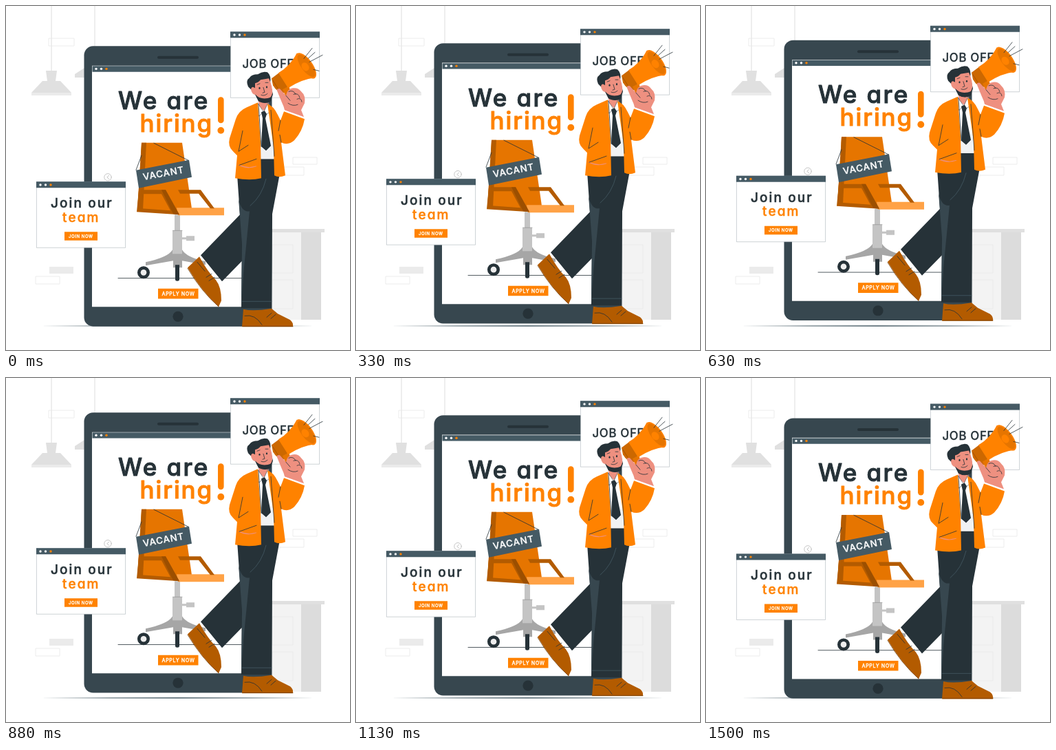
An HTML page for the animation above (1540 ms loop, 500x500 px).

```html
<!DOCTYPE html>
<html lang="en">
<head>
<meta charset="utf-8">
<style>
  html, body { margin: 0; width: 100%; height: 100%; overflow: hidden; background: #fff; }
  svg { display: block; width: 100vw; height: 100vh; }
  text { font-family: Inter, "Open Sans", sans-serif; font-weight: 500; font-feature-settings: "cv11"; stroke-width: .3; stroke-linejoin: round; }
  .big { font-size: 35px; letter-spacing: 2.4px; stroke-width: 1; }
  .mid { font-size: 19px; letter-spacing: 2.1px; stroke-width: .5; }
  .ink { fill: #263238; } .slate { fill: #37474f; } .steel { fill: #455a64; }
  .orange { fill: #ff8200; } .amber { fill: #e67500; } .brown { fill: #b35b00; }
  .skin { fill: #ee9080; } .white { fill: #fff; }
  text.ink { stroke: #263238; } text.orange { stroke: #ff8200; } text.white { stroke: #fff; }
  .line { fill: none; stroke: #263238; stroke-width: .8; stroke-linecap: round; stroke-linejoin: round; }
  .faint { fill: none; stroke: #e8e8e8; stroke-width: .8; }
</style>
</head>
<body>
<svg viewBox="0 0 500 500">
  <defs>
    <g id="dots">
      <circle class="white" r="1.7"/>
      <circle class="white" cx="7.5" r="1.7"/>
      <circle class="orange" cx="15" r="1.7"/>
    </g>
    <g id="window">
      <path d="M.4 .4H129.6V96H.4Z" fill="#fff" stroke="#9aa5aa" stroke-width=".5"/>
      <path class="steel" d="M0 0H130V9H0Z"/>
      <use href="#dots" x="6" y="4.7"/>
    </g>
  </defs>

  <!-- room -->
  <g fill="#e0e0e0">
    <path d="M66 0V95M129 0V90" stroke="#dcdcdc"/>
    <path d="M58 94H74L72 109H60Z"/>
    <path d="M37 126 53 109H79L95 126V130H37Z"/>
    <path d="M37 126H95V130H37Z" fill="#ebebeb"/>
    <path d="M100 99 114 90V104H100Z"/>
    <path d="M63 379H98V389H63Z" fill="#ebebeb"/>
    <path d="M385 329H429V456H385Z" fill="#f3f3f3"/>
    <path d="M429 329H458V456H429Z" fill="#dcdcdc"/>
    <path d="M385 324H463V329H385Z"/>
    <path class="faint" d="M62 47H99V58H62ZM43 393H78V404H43ZM417 220H452V230H417ZM385 234H433V246H385ZM387 347H417V388H387ZM387 398H417V440H387Z"/>
  </g>
  <path class="steel" d="M50 465Q249 463.6 449 465Q249 466.4 50 465Z"/>

  <g id="float">
    <!-- tablet -->
    <rect class="slate" x="113.500" y="58" width="273" height="407.300" rx="13"/>
    <path class="white" d="M125 86.400H376V437H125Z"/>
    <path class="steel" d="M125.500 87H376V95.300H125.500Z"/>
    <use href="#dots" x="131" y="91"/>
    <rect class="ink" x="220" y="72.500" width="60" height="4" rx="2"/>
    <circle class="ink" cx="250" cy="451" r="7.600"/>
    <circle class="line" cx="148" cy="248.500" r="5.200" style="stroke:#b8b8b8"/>
    <path class="line" d="M149.500 246 147 248.500 149.500 251" style="stroke:#aaa"/>
    <text class="big ink" x="163" y="149.700">We are</text>
    <text class="big orange" x="194.500" y="182.500" style="letter-spacing:1.900px">hiring</text>
    <rect class="orange" x="308" y="132" width="8.600" height="38" rx="4.200"/>
    <circle class="orange" cx="312.300" cy="180.500" r="4.900"/>
    <path class="orange" d="M221 410.500H279.500V425.200H221Z"/>
    <text class="white" x="226.500" y="420.600" font-size="7.200" letter-spacing=".55">APPLY NOW</text>

    <!-- windows -->
    <use href="#window" x="326" y="37"/>
    <text class="ink" x="343.500" y="89.500" font-size="16.800" letter-spacing=".7">JOB OFFER</text>
    <use href="#window" x="44" y="255"/>
    <text class="mid ink" x="65" y="293">Join our</text>
    <text class="mid orange" x="82" y="313.500">team</text>
    <path class="orange" d="M85 328H133V340.500H85Z"/>
    <text class="white" x="91" y="336.500" font-size="6" letter-spacing=".6">JOIN NOW</text>

    <!-- chair -->
    <path class="line" d="M163 395.300H344"/>
    <path fill="#a6a6a6" d="M242 354Q236 365 203 372V377L243 370V380H256V370L290 376V371Q262 365 256 354Z"/>
    <path fill="#c4c4c4" d="M245 303H253V326H256V360H242V326H245ZM256 336H262V334H274V341H262V339H256Z"/>
    <path class="line" d="M242.500 326H256" style="stroke:#999"/>
    <path class="ink" d="M246 376H252V397Q252 399.500 249 399.500T246 397Z"/>
    <circle class="ink" cx="200" cy="387" r="9"/>
    <circle cx="200" cy="387" r="4.300" fill="#eee"/>
    <path class="amber" d="M197 198.500H256L270 294 245 300 191 297Z"/>
    <path class="brown" d="M197 198.500H204L199 296 191 297Z"/>
    <path d="M248 293H317V304H250Z" fill="#ffa246"/>
    <path class="brown" d="M250 267H283L303 294H297L280 272.500H253Z"/>
    <path class="brown" fill-rule="evenodd" d="M193 267H232L252 303 190 299ZM199 273 197 294 239 297 226 273Z"/>
    <path fill="#9c4f00" d="M226 267H232L252 303 243 302Z"/>
    <path class="line" d="M189 238 197 217M215 199 265 224"/>
    <path class="steel" d="M189 238.500 266 223.500 270 248.500 193 264.500Z"/>
    <text class="white" transform="translate(200 253) rotate(-10.500)" font-size="13.400" letter-spacing=".9">VACANT</text>

    <!-- legs -->
    <path class="ink" d="M338 245H385L382 310 363 350 314 400 283 362 342 301Z"/>
    <path class="ink" d="M336 245 366 218H392L398 243 387 302 386 439H342L343 345Z"/>
    <path class="slate" d="M338 280Q342 300 354 298L345 390 342 438 343 345Z"/>
    <path class="line" d="M343 429H386M378 251Q372 276 355 290" style="stroke:#455a64"/>
    <path class="brown" d="M264 380 281 364Q293 386 305 398 313 408 313 428L309 437Q284 414 264 380Z"/>
    <path class="line" d="M264 381Q284 415 309 436.500" style="stroke:#713900"/>
    <path class="line" d="M278 372 289 385M291 394 299 389M295 399 303 394"/>
    <path class="brown" d="M345 440.500Q359 444 386 439.500L395 447 413 456Q418 460 417 466H343Z"/>
    <path class="line" d="M344 465.300H417" style="stroke:#713900"/>
    <path class="line" d="M379 452 386 446M385 454 392 448M347 450Q362 447 372 463"/>

    <!-- body -->
    <path class="white" d="M360 144 372 139 383 145 394 222H367Z"/>
    <path d="M367 180 394 200V222H367Z" fill="#f0f2f3"/>
    <path class="skin" d="M366 132 380 130 383 146 376 153 368 146Z"/>
    <path class="white" d="M366 141 374 153 368 160 361 146ZM381 140 384 153 379 157 375 153Z" stroke="#37474f" stroke-width=".6"/>
    <path class="ink" d="M371 154 376 152 379 157 377 163 385 203 378 210 371 204 373 163Z"/>
    <path class="orange" d="M366 140 350 147Q338 152 334 164L325 192Q322 204 330 211L336 217 333 250Q355 254 371 250L370 199Z"/>
    <path class="orange" d="M380 142Q389 145 395 158L399 166 404 153 434 164Q431 182 419 195 410 203 400 198L406 246Q397 250 390 246L389 205Z"/>
    <path class="skin" d="M338 230 364 226 364 233Q350 238 338 231Z"/>
    <path class="orange" d="M336 223 363 217 365 232 354 234Q345 233 337 230Z"/>
    <path class="line" d="M339 231 364 222M344 181 338 211 352 202M399 166 396 181M400 198 398 187M367 142 371 204M385 151 390 218"/>

    <!-- head -->
    <path class="ink" d="M352 117Q348 108 354 104 357 99 366 99 373 94 380 96 386 101 384 112L388 128 385 138Q377 143 367 138L361 126Z"/>
    <path class="skin" d="M362 112Q367 111 370 107L382 105Q388 118 387 127 385 136 376 137 367 136 363 129 357 128 356 121 357 115 362 119Z"/>
    <path class="ink" d="M362 128Q371 138 386 132L384 139Q375 143 367 138Z"/>
    <ellipse class="ink" cx="368.500" cy="119" rx="1.100" ry="1.600"/>
    <ellipse class="ink" cx="379" cy="117.500" rx="1.100" ry="1.600"/>
    <path class="line" d="M365 114 369 112.500M377 111 381 111M374 118 376 125 373 126M371 129Q376 131 380 127"/>

    <!-- megaphone -->
    <path d="M386 105 398 96 412 118 404 126Q394 126 388 115Z" fill="#cc6800"/>
    <path class="amber" d="M402 121 411 116 415 128 407 132Z"/>
    <path class="orange" d="M396 97Q413 87 423 68L449 104Q430 106 410 119Z"/>
    <path class="line" d="M388 108 398 124" style="stroke:#9c4f00"/>
    <ellipse class="orange" cx="436" cy="86.500" rx="9.500" ry="22" transform="rotate(-36 436 86.500)"/>
    <ellipse class="amber" cx="436.500" cy="86.500" rx="7.500" ry="19.500" transform="rotate(-36 436.500 86.500)"/>
    <ellipse class="orange" cx="435" cy="88" rx="5" ry="6.500" transform="rotate(-36 435 88)"/>
    <path class="line" d="M433 76 445 61M441 81 460 71M447 92 455 94M439 76 449 67"/>
    <path class="skin" d="M394 123Q393 119 398 120L407 130Q409 120 417 119 425 118 429 124 436 130 434 141L429 151 433 161 405 151Q404 146 401 140Z"/>
    <path class="line" d="M407 130 413 137M411 124Q418 121 421 128M418 128Q425 125 427 133M423 135Q429 132 430 139M410 141Q417 146 424 143"/>
  </g>
</svg>
<script>
  const PERIOD = 1540, LEAD = 40, LIFT = 9, REST = 0.4;
  const float = document.getElementById("float");

  function draw(now) {
    const phase = (now + LEAD) / PERIOD * 2 * Math.PI;
    const y = REST - LIFT * (1 - Math.cos(phase)) / 2;
    float.setAttribute("transform", `translate(0 ${y.toFixed(2)})`);
    requestAnimationFrame(draw);
  }
  draw(0);
</script>
</body>
</html>
```
